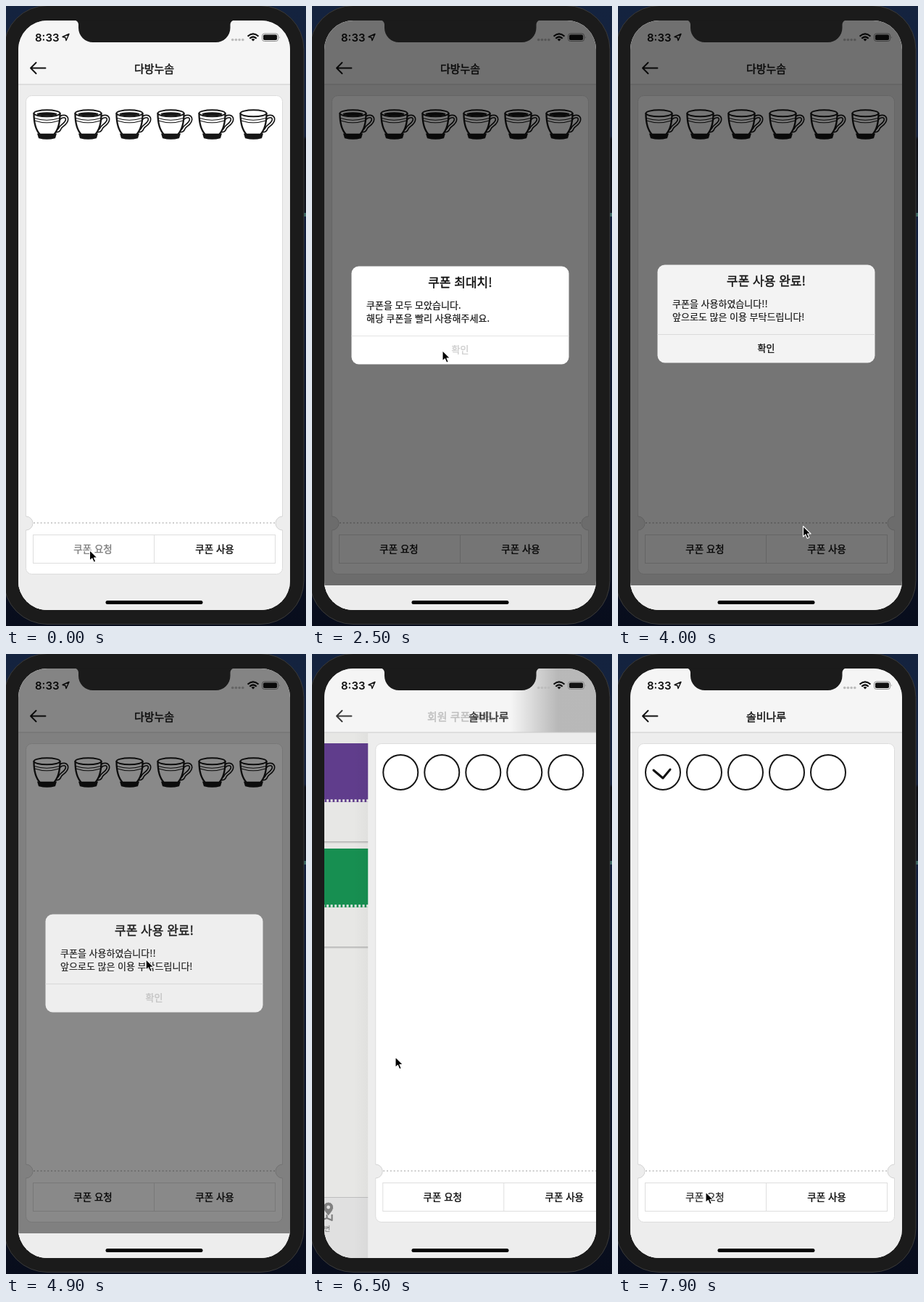
These frames come from a looping animation (414 by 854 pixels, 8000 ms). An HTML page:

```html
<!DOCTYPE html>
<html lang="ko">
<head>
<meta charset="utf-8">
<title>Coupon app</title>
<style>
  html, body { margin: 0; width: 100%; height: 100%; overflow: hidden; background: #0d1526; }
  svg { display: block; width: 414px; height: 854px; }
  text { font-family: 'Noto Sans CJK KR', 'Noto Sans CJK JP', 'Noto Sans CJK', sans-serif; }
  .clock { font-family: Inter, 'Liberation Sans', sans-serif; font-weight: 600; }
</style>
</head>
<body>
<svg id="stage" viewBox="0 0 414 854" xmlns="http://www.w3.org/2000/svg"></svg>
<script>
const LOOP = 8000, STEP = 100, DIM = 0.54;
const shops = ['다방누솜', '솔비나루'];

// ---------- drawing helpers ----------
const range = n => [...Array(n).keys()];

// y is the middle of the line; weight is a thin outline added to the regular cut
function label(x, y, str, size, { fill = '#111', anchor = 'middle', weight = 0.4, id = '' } = {}) {
  return `<text ${id && `id="${id}"`} x="${x}" y="${y + size * 0.37}" font-size="${size}" text-anchor="${anchor}"
    fill="${fill}" stroke="${fill}" stroke-width="${weight}">${str}</text>`;
}

const rect = (x, y, w, h, fill, extra = '') =>
  `<rect x="${x}" y="${y}" width="${w}" height="${h}" fill="${fill}" ${extra}/>`;

const handle = 'M36 13.5C40 8.5 47.5 9 47 14.5C46.500 20 40.500 22 38 25.500C36.500 28 36.500 30.500 32.500 30';

const cup = i => `
  <g transform="translate(${37 + 57 * i} 142)" fill="none" stroke="#161616" stroke-linecap="round">
    <path d="${handle}" stroke-width="5"/>
    <path d="${handle}" stroke-width="1.700" stroke="#fff"/>
    <path d="M1.500 6C1.500 19 4 29 10 35H29C35 29 37.500 19 37.500 6" fill="#fff" stroke-width="2.300"/>
    <path d="M7 34.500Q19.500 37.500 32 34.500L30.500 39.500Q19.500 42.500 8.500 39.500Z" fill="#161616" stroke-width="1.400"/>
    <path d="M2.500 12.500Q19 18 36.500 12.500M3 16Q19 21.500 36 16" stroke-width="1.100"/>
    <ellipse cx="19.500" cy="5.800" rx="18" ry="4.500" fill="#fff" stroke-width="2"/>
    <ellipse id="coffee${i}" cx="19.500" cy="6.800" rx="14" ry="2.600" fill="#161616" stroke="none"/>
  </g>`;

const ring = i => `<circle cx="${62 + 57 * i}" cy="163" r="24" fill="#fff" stroke="#161616" stroke-width="2"/>`;

const shopCard = (y, color, mark, name) => `
  ${rect(32, y + 1, 345, 136.5, '#000', 'rx="4" opacity=".12"')}
  ${rect(32, y, 345, 136, '#000', 'rx="4" opacity=".1"')}
  ${rect(32, y, 345, 135, '#fcfcfa', 'rx="4"')}
  <path d="M32 ${y + 81}V${y + 4}q0-4 4-4H373q4 0 4 4V${y + 81}Z" fill="${color}"/>
  <path d="M32 ${y + 79}H377" stroke="#fcfcfa" stroke-width="3.500" stroke-dasharray="3 2.500"/>
  <circle cx="71" cy="${y + 40}" r="24" fill="${mark}"/>
  ${label(361, y + 32, name, 17, { fill: '#fff', anchor: 'end', weight: 0.6 })}
  ${rect(194, y + 127, 21, 3, '#a3a3a3', 'rx="1.500"')}`;

const listView = `
  ${rect(-100, 109, 600, 723, '#fcfcfa')}
  ${shopCard(123, '#694299', '#121212', shops[0])}
  ${shopCard(268, '#199c58', '#1c4a3a', shops[1])}
  ${rect(17, 748, 375, 84, '#f4f4f4')}
  ${rect(17, 748, 375, 1, '#cfcfcf')}
  <g fill="none" stroke="#8b8b8b" stroke-width="2.200" stroke-linejoin="round">
    <path d="M110 760L107 761.500L100 758V777L107 780L115 777L122 780V772M107 761.500V780M115 772V777"/>
    <path d="M117 774C113 769 110 766 110 762a7 7 0 0 1 14 0C124 766 121 769 117 774Z" fill="#8b8b8b" stroke="#f4f4f4" stroke-width="1"/>
    <circle cx="117" cy="762" r="2.400" fill="#f4f4f4" stroke="none"/>
  </g>
  ${label(111, 791, '주변', 9.5, { fill: '#8b8b8b', weight: 0.1 })}
  ${range(3).map(i => `<circle cx="288" cy="${760 + 8 * i}" r="2" fill="#e0524f"/>
    ${rect(293, 759 + 8 * i, 18, 2, '#e0524f')}`).join('')}
  ${label(298, 791, '업체', 9.5, { fill: '#e0524f', weight: 0.1 })}`;

const notchSide = (x, sweep) => `
  <path d="M${x} 703V722" stroke="#ededed" stroke-width="3"/>
  <path d="M${x} 703a9.500 9.500 0 0 ${sweep} 0 19" fill="#ededed" stroke="#d3d3d3"/>`;

const detailView = `
  ${rect(-3, 109, 20, 723, 'url(#edge)')}
  ${rect(17, 109, 375, 723, '#ededed')}
  ${rect(27.5, 123.5, 354, 659, '#fff', 'rx="8" stroke="#dcdcdc"')}
  ${notchSide(27.5, 1)}${notchSide(381.5, 0)}
  <path d="M38 712H371" stroke="#cdcdcd" stroke-width="2" stroke-dasharray="2 2.800"/>
  ${rect(37.5, 728.5, 334, 39, '#fff', 'stroke="#dedede"')}
  ${rect(204, 729, 1, 39, '#dedede')}
  ${label(120, 748, '쿠폰 요청', 13.5, { id: 'ask' })}
  ${label(288, 748, '쿠폰 사용', 13.5, { id: 'spend' })}
  <g id="cups">${range(6).map(cup).join('')}</g>
  <g id="rings">${range(5).map(ring).join('')}
    <path id="tick" d="M49 160L62 171L72 159" fill="none" stroke="#111" stroke-width="3"
      stroke-linecap="round" stroke-linejoin="round" pathLength="100" stroke-dasharray="100 200"/></g>`;

const header = `
  ${rect(17, 20, 375, 88, '#f5f5f5')}
  ${label(204.5, 86, '회원 쿠폰 목록', 15, { id: 'listTitle' })}
  ${label(204.5, 86, '', 15, { id: 'shopTitle' })}
  <path id="back" d="M54.500 85.500H34M41.500 78L34 85.500L41.500 93" fill="none" stroke="#111" stroke-width="1.900"
    stroke-linecap="round" stroke-linejoin="round"/>
  ${rect(17, 20, 375, 88, 'url(#shade)', 'id="shadeRect"')}
  ${rect(17, 107.5, 375, 1, '#cbcbcb')}`;

const statusBar = `
  <text class="clock" x="40" y="48.500" font-size="15" fill="#111">8:33</text>
  <path d="M87 38.500L83 47.500L82 43.500L78 42.500Z" fill="none" stroke="#111" stroke-width="1.400" stroke-linejoin="round"/>
  ${range(4).map(i => `<circle cx="${312.7 + 4.7 * i}" cy="46.500" r="1.800" fill="#bcbcbc"/>`).join('')}
  <g fill="none" stroke="#111" stroke-width="2.200">
    <path d="M333.500 41.700Q341 35 348.500 41.700M336.300 44.700Q341 40.300 345.700 44.700"/>
    <path d="M338.500 46L341 48.500L343.500 46Q341 44 338.500 46Z" fill="#111" stroke="none"/>
  </g>
  ${rect(353.5, 38, 22, 10.5, 'none', 'rx="3" stroke="#8a8a8a"')}
  ${rect(355, 39.5, 19, 7.5, '#111', 'rx="1.800"')}
  <path d="M377 41.500q1.500 1.700 0 3.500Z" fill="#8a8a8a"/>`;

const dialog = `
  ${rect(54.5, 358.5, 300, 135, '#fff', 'rx="10"')}
  ${label(204.5, 381, '', 17, { id: 'dlgTitle', weight: 0.5 })}
  ${label(75, 412, '', 13, { id: 'line1', anchor: 'start', weight: 0.2 })}
  ${label(75, 429.7, '', 13, { id: 'line2', anchor: 'start', weight: 0.2 })}
  ${rect(54.5, 454, 300, 1, '#e4e4e4')}
  ${label(204.5, 473, '확인', 13, { id: 'ok' })}`;

document.getElementById('stage').innerHTML = `
  <defs>
    <clipPath id="screen"><rect x="17" y="20" width="375" height="812" rx="40"/></clipPath>
    <linearGradient id="edge"><stop stop-opacity="0"/><stop offset="1" stop-opacity=".03"/></linearGradient>
    <linearGradient id="shade" gradientUnits="userSpaceOnUse" y1="0" y2="0">
      <stop stop-opacity="0"/><stop offset="1"/></linearGradient>
    <linearGradient id="desk" x2="0" y2="1"><stop stop-color="#14233f"/><stop offset=".21" stop-color="#14213d"/>
      <stop offset=".215" stop-color="#0b0d14"/><stop offset=".33" stop-color="#11151f"/>
      <stop offset=".34" stop-color="#101d3c"/><stop offset="1" stop-color="#080d1c"/></linearGradient>
  </defs>
  ${rect(0, 0, 414, 854, 'url(#desk)')}
  ${rect(411, 285, 3, 5, '#3d6b66')}
  ${rect(-3, -0.5, 414, 852, '#1b1b1b', 'rx="60" stroke="#3a3a3a"')}
  <g clip-path="url(#screen)">
    ${rect(17, 20, 375, 812, '#ededed')}
    <g id="list">${listView}</g>
    ${rect(17, 109, 375, 723, '#000', 'id="listDim"')}
    <g id="detail">${detailView}</g>
    ${header}${statusBar}
    ${rect(17, 20, 375, 778, '#000', 'id="dim"')}
    <g id="dialog">${dialog}</g>
    ${rect(137.5, 819, 134, 5, '#000', 'rx="2.500"')}
  </g>
  <path d="M94 19.500a6 6 0 0 1 6 6V30a20 20 0 0 0 20 20H289.500a20 20 0 0 0 20-20V25.500a6 6 0 0 1 6-6Z" fill="#1b1b1b"/>
  <path id="cursor" d="M0 0V14.500L3.400 11.400L5.700 16.800L8.300 15.700L6 10.500H10.600Z" fill="#000" stroke="#fff"
    stroke-width="1.100" stroke-linejoin="round"/>`;

const el = {};
document.querySelectorAll('[id]').forEach(n => el[n.id] = n);
const set = (id, attrs) => Object.entries(attrs).forEach(([k, v]) => el[id].setAttribute(k, v));
const show = (id, on) => set(id, { visibility: on ? 'visible' : 'hidden' });

// ---------- timing ----------
const clamp = v => Math.max(0, Math.min(1, v));

// linear track of [time, value, value...]
function track(t, keys, col = 1) {
  const i = keys.findIndex(k => k[0] > t);
  if (i < 0) return keys[keys.length - 1][col];
  if (i === 0) return keys[0][col];
  const a = keys[i - 1], b = keys[i];
  return a[col] + (b[col] - a[col]) * (t - a[0]) / (b[0] - a[0]);
}

// cubic-bezier(.2833, .99, .3183, .99)
function glide(x) {
  const bez = (s, a, b) => 3 * (1 - s) ** 2 * s * a + 3 * (1 - s) * s * s * b + s ** 3;
  let lo = 0, hi = 1;
  for (let i = 0; i < 24; i++) {
    const mid = (lo + hi) / 2;
    bez(mid, 0.2833, 0.3183) < x ? lo = mid : hi = mid;
  }
  return bez(lo, 0.99, 0.99);
}

const pointer = [[0, 115.5, 749.5], [1900, 115.5, 749.5], [2300, 180, 474.5], [2800, 180, 474.5],
  [3100, 285, 750], [3500, 285, 750], [3750, 275, 790], [4000, 255.5, 716.5], [4400, 218, 476.5],
  [4850, 218, 476.5], [5200, 44, 86], [5500, 44, 86], [5700, 163, 200.5], [6100, 130, 315],
  [6300, 130, 315], [6500, 115, 555], [6800, 121, 741], [8000, 121, 741]];
const askFade = [[0, 0.53], [100, 0.65], [300, 1], [800, 1], [900, 0.4], [1100, 0.8], [1300, 0.22],
  [1700, 0.22], [1950, 1], [7100, 1], [7250, 0.2], [7600, 0.2], [7900, 0.85], [8000, 1]];
const spendFade = [[3050, 1], [3200, 0.2], [3400, 0.2], [3700, 1]];
const okFade = [[2300, 1], [2500, 0.2], [2700, 0.6], [2800, 1], [4600, 1], [4700, 0.2], [4900, 0.2], [5100, 1]];
const dimTrack = [[1100, 0], [1400, 1], [2500, 1], [2700, 0], [3200, 0], [3450, 1], [4850, 1], [5200, 0]];
const tickTrack = [[7250, 0], [7600, 1]];

const alerts = [
  { start: 1573, title: '쿠폰 최대치!', lines: ['쿠폰을 모두 모았습니다.', '해당 쿠폰을 빨리 사용해주세요.'] },
  { start: 3551, title: '쿠폰 사용 완료!', lines: ['쿠폰을 사용하였습니다!!', '앞으로도 많은 이용 부탁드립니다!'] }
];

function drawScreens(t) {
  // open: 1 = coupon page, 0 = shop list
  const open = t < 6200 ? 1 - glide(clamp((t - 5498) / 500)) : glide(clamp((t - 6338) / 500));
  const away = 1 - open, second = t >= 6200;
  set('detail', { transform: `translate(${375 * away} 0)` });
  set('list', { transform: `translate(${-112.5 * open} 0)` });
  set('listDim', { opacity: 0.1 * open });
  set('listTitle', { opacity: clamp(away * 1.5) });
  set('shopTitle', { opacity: open, transform: `translate(${254 * away - 53 * away * away} 0)` });
  el.shopTitle.textContent = shops[+second];
  set('back', { opacity: clamp(open * 1.08 - 0.08) });
  const x1 = 354 - 95 * open;
  set('shade', { x1, x2: x1 + 65 });
  set('shadeRect', { opacity: (0.03 + 0.26 * open) * clamp(open / 0.05) * clamp(away / 0.1) });

  show('cups', !second);
  show('rings', second);
  for (const i of range(6)) {
    const full = t < 3200 && (i < 5 || t >= 900);
    set('coffee' + i, { opacity: +full });
  }
  const drawn = track(t, tickTrack);
  set('tick', { opacity: drawn > 0 ? 1 : 0, 'stroke-dashoffset': 100 * (1 - drawn) });
}

function drawAlert(t) {
  const dim = track(t, dimTrack);
  const alert = alerts[t < 3000 ? 0 : 1];
  const left = (1 - clamp((t - alert.start) / 630)) ** 2;
  set('dim', { opacity: DIM * dim });
  set('dialog', { opacity: (1 - left) * dim, transform: `translate(0 ${-24 * left})` });
  el.dlgTitle.textContent = alert.title;
  el.line1.textContent = alert.lines[0];
  el.line2.textContent = alert.lines[1];
}

function draw(t) {
  drawScreens(t);
  drawAlert(t);
  set('ask', { opacity: track(t, askFade) });
  set('spend', { opacity: track(t, spendFade) });
  set('ok', { opacity: track(t, okFade) });
  set('cursor', { transform: `translate(${track(t, pointer, 1)} ${track(t, pointer, 2)})` });
}

// the picture advances ten times a second
const began = performance.now();
function tick() {
  const t = (performance.now() - began) % LOOP;
  draw(Math.floor(t / STEP) * STEP);
  requestAnimationFrame(tick);
}
tick();
</script>
</body>
</html>
```
